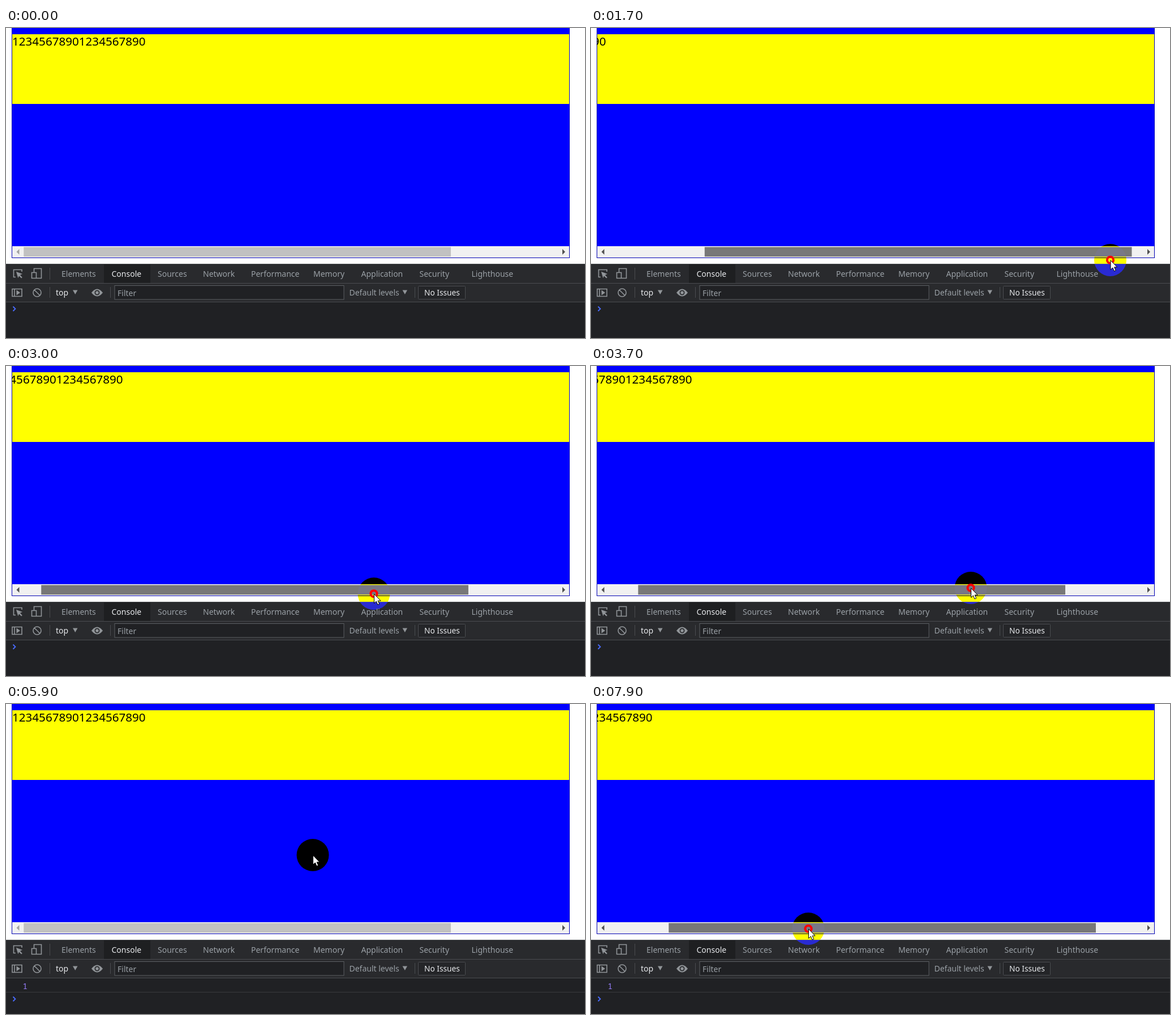
Write an HTML page that moves like this. It is 1023 px wide and 547 px high and loops after 8 s.

```html
<!DOCTYPE html>
<html lang="en">
<head>
<meta charset="utf-8">
<title>Scroll end demo</title>
<style>
  html, body { margin: 0; width: 100%; height: 100%; overflow: hidden; background: #fff; }
  svg { display: block; width: 1023px; height: 547px; isolation: isolate; }
  text { font: 14px "Noto Sans", "Open Sans", sans-serif; fill: #9aa0a6; }
  .digits { font-size: 20.6px; fill: #000; }
  .log { font: 14px "Noto Sans Mono", monospace; fill: #9980ff; }
  .lit { fill: #e8eaed; }
  .line { fill: none; stroke: #919599; stroke-width: 1.6; }
  .rule { fill: none; stroke: #4a4c50; }
  .solid { fill: #919599; }
  #spot { fill: #00f; mix-blend-mode: difference; }
</style>
</head>
<body>
<svg viewBox="0 0 1023 547">
  <defs><clipPath id="view"><rect x="10" y="11" width="985" height="123"/></clipPath></defs>
  <rect width="1023" height="547" fill="#fff"/>

  <!-- scrolling box -->
  <rect x="10" width="986" height="406" fill="#0000b4"/>
  <rect x="11" width="984" height="385" fill="#00f"/>
  <rect x="11" y="11" width="984" height="123" fill="#ff0"/>
  <g clip-path="url(#view)"><text id="digits" class="digits" x="11" y="31">12345678901234567890</text></g>
  <rect x="11" y="385" width="984" height="20" fill="#f1f1f1"/>
  <rect id="thumb" x="31.3" y="386.5" width="754.7" height="17"/>
  <path id="left" d="M18.5 395l5-5v10z"/>
  <path id="right" d="M988 395l-5-5v10z"/>

  <!-- developer tools -->
  <rect y="416" width="1023" height="131" fill="#202124"/>
  <rect y="416" width="1023" height="67" fill="#292a2d"/>
  <rect x="173" y="417" width="82" height="33" fill="#1e1f21"/>
  <path class="rule" d="M0 416.5H1023M0 450.5H1023M0 483.5H1023M77.5 423V444M77.5 457V476M184.5 457V476M722.5 457V476"/>

  <text x="98" y="439">Elements</text>
  <text x="186.5" y="439" class="lit">Console</text>
  <text x="268" y="439">Sources</text>
  <text x="348" y="439">Network</text>
  <text x="433" y="439">Performance</text>
  <text x="543" y="439">Memory</text>
  <text x="627.5" y="439">Application</text>
  <text x="730.5" y="439">Security</text>
  <text x="822.5" y="439">Lighthouse</text>

  <path class="line" d="M17 439.5H13.5V426.5H28V430"/>
  <path class="solid" d="M18 430l11 4-4.2 1.8 4 4.2-1.6 1.6-4.2-4.2-1.6 3.8z"/>
  <path class="line" d="M49.5 431V424.5H62.5V441.5H54M45.5 431.5H53.5V441.5H45.5Z"/>
  <path class="line" d="M11 460.5H28V473.5H11ZM15 460V474"/>
  <path class="solid" d="M18.5 462.5l6.5 4.5-6.5 4.5z"/>
  <path class="line" d="M48 467a7 7 0 0 1 14 0a7 7 0 0 1-14 0M50 462l10 10"/>
  <path class="solid" d="M151 467q10-13 20 0q-10 13-20 0z"/>
  <circle cx="161" cy="467" r="3.6" fill="#919599" stroke="#292a2d" stroke-width="1.8"/>
  <path class="solid" d="M118 462.5h8.5l-4.2 7.5zM700.500 462.5h8.5l-4.200 7.5z"/>

  <rect x="192" y="454.5" width="405" height="24.5" fill="#202124" stroke="#5c5f63"/>
  <rect x="728.5" y="455.5" width="83" height="23" rx="1" fill="#242528" stroke="#4a4c50"/>
  <text class="lit" x="88" y="472">top</text>
  <text x="197" y="473">Filter</text>
  <text x="606.5" y="472">Default levels</text>
  <text class="lit" x="739" y="472" style="font-size:13.7px">No Issues</text>

  <g id="log"><text class="log" x="29.5" y="503">1</text><path d="M0 508.5H1023" stroke="#3a3b3e"/></g>
  <path id="prompt" d="M12.5 491.5l4 4-4 4" fill="none" stroke="#4a6cff" stroke-width="1.8"/>

  <!-- pointer -->
  <circle id="spot" r="28.5"/>
  <g id="pointer">
    <circle id="ring" r="5.6" fill="none" stroke="#f00" stroke-width="4"/>
    <path d="M.5.5V17l3.8-3.5 2.6 6 2.8-1.2-2.6-5.8h5z" fill="#fff" stroke="#000"/>
  </g>
</svg>
<script>
  const LOOP = 8000, STEP = 100, LOG_AT = 5800;
  const MAX = 189, RATIO = 1.3; // thumb travel, content px per thumb px
  const $ = id => document.getElementById(id);

  // turning points and rests of the pointer
  const keys = [
    [100, 749, 395], [900, 846, 388.5], [1400, 946, 404], [1900, 880, 411],
    [2400, 682, 399], [2800, 619, 403], [3500, 775, 394], [3700, 671, 391.5],
    [4500, 321.5, 369.5], [4900, 542, 266.5], [6700, 542, 266.5],
    [6900, 279, 394], [7600, 279, 394], [7800, 389, 396.5], [7900, 384, 396.5]
  ].map(([t, x, y]) => ({ t, x, y }));

  const drags = [
    { from: 300, to: 2600, grip: 748 },
    { from: 2800, to: 4300, grip: 619 },
    { from: 7700, to: LOOP, grip: 278 }
  ];

  const slope = (a, b, axis) => (b[axis] - a[axis]) / (b.t - a.t);

  // slope through key i: flat at a turn, else the harmonic mean of both sides
  function tangent(i, axis) {
    if (!keys[i - 1] || !keys[i + 1]) return 0;
    const p = slope(keys[i - 1], keys[i], axis), q = slope(keys[i], keys[i + 1], axis);
    return p * q > 0 ? 2 * p * q / (p + q) : 0;
  }

  function pointerAt(t, axis) {
    const i = Math.max(1, keys.findIndex(k => k.t >= t));
    const a = keys[i - 1], b = keys[i], span = b.t - a.t;
    const u = Math.max(0, (t - a.t) / span), v = 1 - u;
    return a[axis] + (b[axis] - a[axis]) * u * u * (3 - 2 * u)
      + span * u * v * (v * tangent(i - 1, axis) - u * tangent(i, axis));
  }

  const show = (id, on) => $(id).setAttribute('visibility', on ? 'visible' : 'hidden');
  const move = (id, x, y) => $(id).setAttribute('transform', `translate(${x} ${y})`);
  const fill = (id, color) => $(id).setAttribute('fill', color);

  function draw(t) {
    const x = pointerAt(t, 'x'), y = pointerAt(t, 'y');
    const drag = drags.find(d => t >= d.from && t < d.to);
    const shift = drag ? Math.min(MAX, Math.max(0, x - drag.grip)) : 0;
    const seen = t >= STEP, logged = t >= LOG_AT;
    const hover = seen && y > 386 && y < 404;

    move('digits', -Math.round(shift * RATIO), 0);
    move('thumb', shift, 0);
    fill('thumb', drag ? '#787878' : hover ? '#a8a8a8' : '#c1c1c1');
    fill('left', shift > 0 ? '#505050' : '#a3a3a3');
    fill('right', shift < MAX ? '#505050' : '#a3a3a3');

    move('spot', x, y);
    move('pointer', x, y);
    show('spot', seen);
    show('pointer', seen);
    show('ring', seen && drag);

    show('log', logged);
    move('prompt', 0, logged ? 25 : 0);
  }

  function tick() {
    draw(Math.floor(performance.now() % LOOP / STEP) * STEP);
    requestAnimationFrame(tick);
  }
  tick();
</script>
</body>
</html>
```
